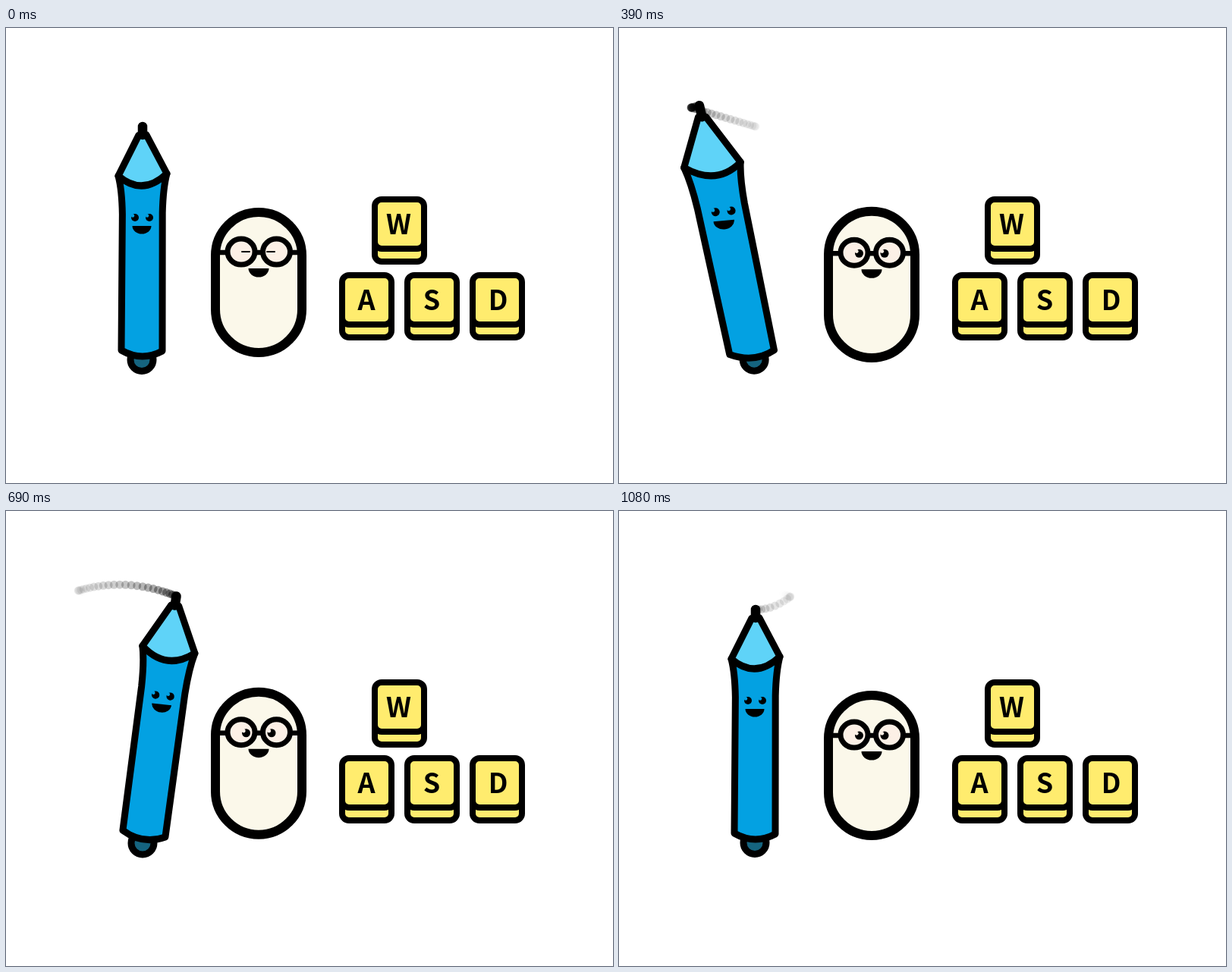
Recreate the animation shown at these times as an HTML page. Size 800 by 600 pixels, loop 1.11 s.

```html
<!DOCTYPE html>
<html lang="en">
<head>
<meta charset="utf-8">
<title>Pen, mouse and keys</title>
<style>
  html, body { margin: 0; width: 100%; height: 100%; overflow: hidden; background: #fff; }
  svg { display: block; width: 800px; height: 600px; }
  text { font: 900 36px "Noto Sans CJK JP", "Noto Sans CJK SC", "Noto Sans", sans-serif; text-anchor: middle; }
  .line { stroke: #000; stroke-linejoin: round; stroke-linecap: round; }
  .key { fill: #ffec6e; stroke-width: 8; }
</style>
</head>
<body>
<svg viewBox="0 0 800 600">
  <g id="trail"></g>
  <g id="pen" class="line" stroke-width="9">
    <circle id="end" r="15" fill="#15647f"/>
    <path id="body" fill="#03a1e2"/>
    <path id="cone" fill="#5fd3f8"/>
    <path id="nib" fill="none" stroke-width="12.5"/>
  </g>
  <g id="face">
    <g id="penEyes"></g>
    <path d="M-12.5 0H12.5A12.5 10.5 0 0 1 -12.5 0Z"/>
  </g>
  <g id="mouse">
    <rect id="shell" class="line" x="276" width="114" rx="57" fill="#fbf8ea" stroke-width="12"/>
    <g id="look">
      <path class="line" fill="none" stroke-width="6.5" stroke-linecap="butt" d="M277 1H290M330 1H337M377 1H390"/>
      <g class="line" fill="#fcf0e6" stroke-width="7">
        <ellipse cx="310" rx="18" ry="17"/>
        <ellipse cx="356.5" rx="18" ry="17"/>
      </g>
      <g id="eyes"></g>
      <path id="lids" class="line" stroke-width="2" d="M311 0H321M344 0H354"/>
      <path d="M319.5 22H346.5A13.5 11.5 0 0 1 319.5 22Z"/>
    </g>
  </g>
  <g id="keys"></g>
</svg>
<script>
const LOOP = 1110, STEP = 30, FADE = 460;
const $ = id => document.getElementById(id);
const set = (el, attrs) => { for (const k in attrs) el.setAttribute(k, attrs[k]); return el; };
const add = (parent, tag, attrs) =>
  parent.appendChild(set(document.createElementNS('http://www.w3.org/2000/svg', tag), attrs));
const mix = (a, b, u) => a + (b - a) * u;
const mixPt = (a, b, u) => [mix(a[0], b[0], u), mix(a[1], b[1], u)];
const ease = u => (1 - Math.cos(Math.PI * Math.min(1, Math.max(0, u)))) / 2;
const bend = (a, c, b, u) => mix(mix(a, c, u), mix(c, b, u), u);

// Pen points: upright, leaning left, leaning right, height of the arc between the leans
const PEN = {
  tip:   [[180, 130], [95, 105], [226, 113], 86],
  top:   [[180, 141], [99, 120], [224, 125], 102],
  left:  [[148, 195], [77, 187], [181, 178], 169],
  right: [[212, 192], [152, 178], [250, 188], 170],
  footL: [[152, 425], [145, 432], [154, 421], 423],
  footR: [[206, 426], [204, 424], [210, 430], 429],
  end:   [[179, 437.5], [178, 437], [180, 438], 438],
  mouth: [[179, 261], [132, 255], [206, 255], 248],
  lean:  [[0, 1], [-6, 1.1], [6, 1.03], 1.1]
};

function penAt(name, t) {
  const [rest, left, right, arc] = PEN[name];
  if (t < 315) return mixPt(rest, left, ease(t / 315));
  if (t < 717) {
    const u = ease((t - 315) / 402);
    return [mix(left[0], right[0], u), bend(left[1], arc, right[1], u)];
  }
  const u = ease((t - 717) / 168);
  const low = name === 'tip' ? 130.5 : (right[1] + rest[1]) / 2;
  return [mix(right[0], rest[0], u), bend(right[1], low, rest[1], u)];
}

function keyed(keys, t) {
  const i = Math.max(1, keys.findIndex(k => k[0] >= t));
  const [a, b] = [keys[i - 1], keys[i]];
  return mix(a[1], b[1], ease((t - a[0]) / (b[0] - a[0])));
}
const SHELL_TOP = [[0, 237], [190, 219], [375, 236], [555, 218], [720, 234], [860, 217], [1080, 237], [1110, 237]];
const SHELL_BOTTOM = [[0, 434], [205, 421], [385, 441], [570, 421], [720, 434], [865, 424], [1080, 434], [1110, 434]];

function eye(parent, x, y, r, back) {
  add(parent, 'circle', { cx: x, cy: y, r });
  add(parent, 'circle', { cx: x - r * .6, cy: y - r * .5, r: r * .45, fill: back });
}
eye($('penEyes'), -9, -11, 5, '#03a1e2');
eye($('penEyes'), 10, -11, 5, '#03a1e2');
eye($('eyes'), 316.5, 1, 5.5, '#fcf0e6');
eye($('eyes'), 350, 1, 5.5, '#fcf0e6');

// Letter, left, top, letter centre, press time, sideways shift of the letter
const keys = [
  ['W', 482, 222, 517.5, 120, 0],
  ['A', 439, 322, 475, 300, 0],
  ['S', 525, 322, 561, 540, 0],
  ['D', 611, 322, 648.5, 840, 5]
].map(([letter, x, y, cx, peak, shift]) => {
  const box = { class: 'line key', x: x + 4, width: 65, rx: 9 };
  add($('keys'), 'rect', { ...box, y: y + 24, height: 62 });
  const cap = add($('keys'), 'rect', { ...box, y: y + 4, height: 65 });
  const label = add($('keys'), 'text', { x: cx, y: y + 50 });
  label.textContent = letter;
  return { cap, label, peak, shift };
});

const dots = Array.from({ length: LOOP / 15 }, (_, i) => {
  const [cx, cy] = penAt('tip', i * 15);
  return add($('trail'), 'circle', { cx, cy, r: 5.5 });
});

// One side of the barrel, pinched just under the cone
function waist(from, to, inset) {
  const [x1, y1] = mixPt(from, to, .08), [x2, y2] = mixPt(from, to, .22);
  return [[x1 + inset, y1], [x2 + inset, y2]];
}

function drawPen(t) {
  const p = {};
  for (const name in PEN) p[name] = penAt(name, t);
  const { tip, top, left, right, footL, footR, end, mouth, lean } = p;
  const ax = end[0] - top[0], ay = end[1] - top[1], len = Math.hypot(ax, ay);
  const below = (a, b, d) => {
    const m = mixPt(a, b, .5);
    return [m[0] + ax / len * d, m[1] + ay / len * d];
  };
  const [l1, l2] = waist(left, footL, 4.5), [r1, r2] = waist(right, footR, -4.5);
  const tilt = (right[1] - left[1]) / 12;
  const rim = `Q${below(left, right, 29)} ${left}`;
  set($('end'), { cx: end[0], cy: end[1] });
  set($('body'), { d: `M${left}Q${l1} ${l2}L${footL}Q${below(footL, footR, 15)} ${footR}L${r2}Q${r1} ${right}Z` });
  set($('cone'), { d: `M${left}L${top[0] - 5},${top[1] - tilt / 2}L${top[0] + 5},${top[1] + tilt / 2}L${right}${rim}Z` });
  set($('nib'), { d: `M${top}L${tip}` });
  set($('face'), { transform: `translate(${mouth}) rotate(${lean[0]}) scale(${lean[1]})` });
}

function drawMouse(t) {
  const top = keyed(SHELL_TOP, t), height = keyed(SHELL_BOTTOM, t) - top;
  set($('shell'), { y: top + 6, height: height - 12 });
  set($('look'), { transform: `translate(0 ${top + height * .295})` });
  const open = ease(t / 90);
  set($('eyes'), { transform: `scale(1 ${open})` });
  set($('lids'), { visibility: open < .2 ? 'visible' : 'hidden' });
}

function draw(t) {
  dots.forEach((dot, i) => {
    const age = t - i * 15;
    const live = age >= 0 && age < FADE;
    set(dot, { opacity: live ? .5 * (1 - age / FADE) ** 1.6 : 0 });
  });
  drawPen(t);
  drawMouse(t);
  for (const { cap, label, peak, shift } of keys) {
    const press = ease(1 - Math.abs(t - peak) / 60);
    set(cap, { transform: `translate(0 ${press * 5.5})` });
    set(label, { transform: `translate(${press * shift} ${press * 5.5})` });
  }
}

const start = performance.now();
function tick() {
  const t = (performance.now() - start) % LOOP;
  draw(Math.floor(t / STEP) * STEP);
  requestAnimationFrame(tick);
}
tick();
</script>
</body>
</html>
```
